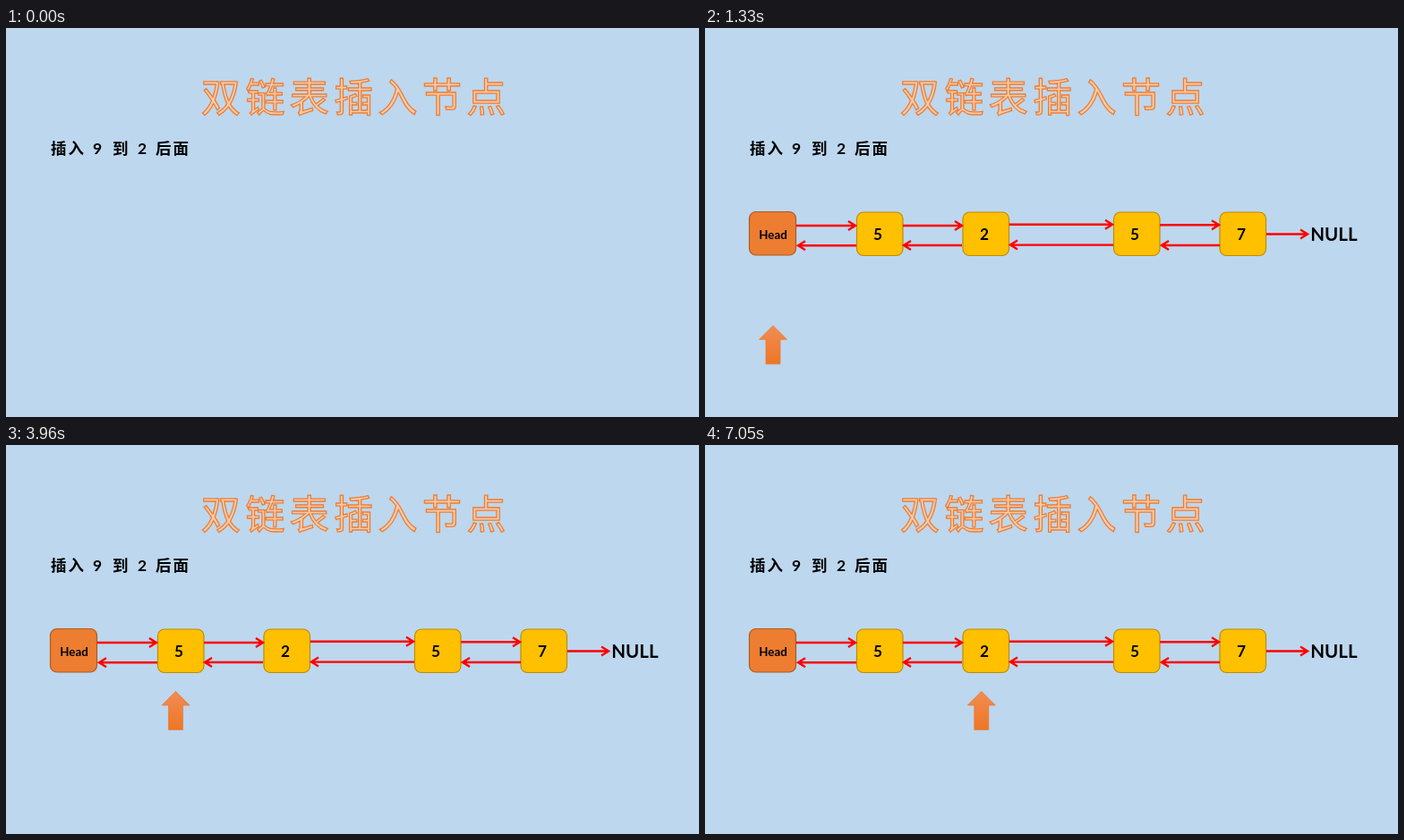
An HTML page for the animation above (8000 ms loop, 774 by 435 pixels).

```html
<!DOCTYPE html>
<html lang="zh">
<head>
<meta charset="utf-8">
<title>双链表插入节点</title>
<style>
  html, body { margin: 0; width: 100%; height: 100%; overflow: hidden; background: #bdd7ee; }
  svg { display: block; }
  text { font-family: Lato, "Noto Sans CJK SC", "Noto Sans CJK", sans-serif; font-weight: bold; }
  .title { font-size: 44px; font-weight: 400; letter-spacing: 5.4px; fill: #f8cbad; stroke: #ed7d31; stroke-width: 1.3; }
  .task { font-size: 17.5px; letter-spacing: 2px; }
  .link { fill: none; stroke: #f00; stroke-width: 2.4; }
  .mid { text-anchor: middle; }
</style>
</head>
<body>
<svg id="stage" width="774" height="435" viewBox="0 0 774 435">
  <defs>
    <linearGradient id="glow" x2="0" y2="1">
      <stop stop-color="#f18c55"/><stop offset="1" stop-color="#ee7623"/>
    </linearGradient>
  </defs>
  <text class="title" x="218" y="94">双链表插入节点</text>
  <g class="task">
    <text x="50" y="141">插入</text><text x="97" y="141">9</text><text x="119" y="141">到</text>
    <text x="147" y="141">2</text><text x="167" y="141">后面</text>
  </g>
  <g id="list"></g>
  <path id="pointer" d="M0 275.5L15.5 291H8V318.5H-8V291H-15.5Z" fill="url(#glow)" stroke="#ed7d31" stroke-width=".8"/>
</svg>
<script>
const LOOP = 8000, BOTTOM = 435;
const list = document.getElementById('list'), pointer = document.getElementById('pointer');
const flying = [];

// Every part flies in on its own, from just below the stage to its place.
function part(top, tag, attrs, text = '') {
  const el = document.createElementNS('http://www.w3.org/2000/svg', tag);
  for (const name in attrs) el.setAttribute(name, attrs[name]);
  el.textContent = text;
  list.append(el);
  flying.push({ el, top });
}
function box(x, y, width, fill, stroke) {
  part(y, 'rect', { x, y, width, height: 48.5, rx: 7.5, fill, stroke, 'stroke-width': 1.2 });
}
function label(x, y, size, text) {
  part(214, 'text', { class: 'mid', x, y, 'font-size': size }, text);
}
function link(from, to, y) {
  const back = to - Math.sign(to - from) * 8;
  part(y - 5, 'path', { class: 'link', d: `M${from} ${y}H${to}M${back} ${y - 5}L${to} ${y}L${back} ${y + 5}` });
}

box(49.5, 205.5, 52, '#ed7d31', '#ae5a21');
for (const x of [169.5, 288, 456.5, 575]) box(x, 206, 51.5, '#ffc000', '#bc8c00');
link(102, 168, 221);
link(221, 287, 221);
link(340, 455, 219.7);
link(508, 574, 220.3);
link(627, 673, 230.5);
link(169, 104, 243.3);
link(287, 222, 243);
link(456, 341, 242.6);
link(575, 510, 243);
label(76, 236, 13.3, 'Head');
[[193, 5], [312, 2], [480, 5], [599, 7]].forEach(([x, n]) => label(x, 237, 17.3, n));
label(702.5, 237.5, 20.5, 'NULL');

const clamp = u => Math.min(1, Math.max(0, u));
const ease = u => u < .5 ? 2 * u * u : 1 - 2 * (1 - u) ** 2;
const hold = (t, first, step) => first + Math.floor((t - first) / step) * step;

// Share of the way still to go; 2 keeps the part off stage.
function remaining(t, first) {
  return t < first ? 2 : 1 - clamp((hold(t, first, 62) - first + 73) / 500);
}
function slide(t, first, start, duration, from, to) {
  return from + (to - from) * ease(clamp((hold(t, first, 60) - start) / duration));
}

function draw(now) {
  const t = now % LOOP;
  const rest = remaining(t, 60);
  for (const { el, top } of flying) el.setAttribute('transform', `translate(0 ${(BOTTOM - top) * rest})`);
  const x = t < 5070 ? slide(t, 2130, 2055, 1960, 76, 190) : slide(t, 5220, 5077, 2000, 187, 309);
  pointer.setAttribute('transform', `translate(${x} ${(BOTTOM - 275) * remaining(t, 1080)})`);
}

const begin = performance.now();
function tick() {
  draw(performance.now() - begin);
  requestAnimationFrame(tick);
}
tick();
</script>
</body>
</html>
```
